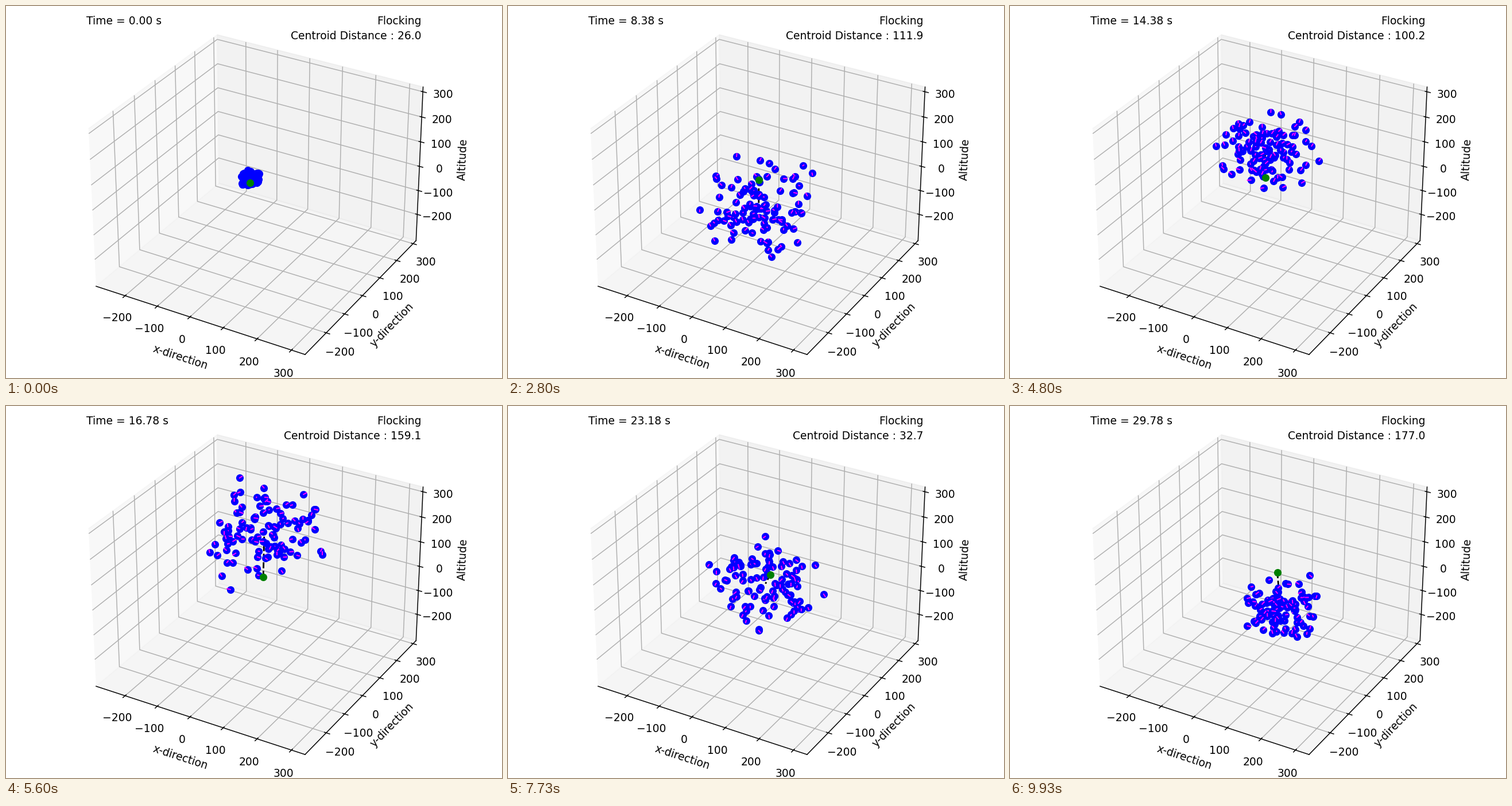
These frames come from a looping animation (864 px wide and 648 px high, 9990 ms). A matplotlib script:

```python
import numpy as np
import matplotlib.pyplot as plt
from matplotlib.animation import FuncAnimation

FRAMES, LOOP_MS = 150, 9990
BIRDS, GROUP = 100, 10
HEADING = 9

# step, centroid offset from the leader (x, y, z), flock spread
KEYS = np.array([
    [0, 3, -5.2, 25.3, 11.5],
    [15, 2, -3, -83, 30],
    [30, 0, 0, -172, 48],
    [42, 0, 0, -111.9, 66],
    [60, 2, -16, 17.5, 40],
    [84, -15, 31, 155.3, 67],
    [94, -12, 14, 163, 62],
    [105, -8, -6, 99.4, 55],
    [126, -2, -17, -134.4, 70],
    [138, -5, 10, -184, 58],
    [149, -7, 30, -174.3, 43],
])


def spline(t, knots, values):
    """Cubic Hermite curve through the knots."""
    slopes = np.gradient(values, knots, axis=0)
    k = np.clip(np.searchsorted(knots, t, side="right") - 1, 0, len(knots) - 2)
    h = (knots[k + 1] - knots[k])[:, None]
    s = (t - knots[k])[:, None] / h
    return ((1 + 2 * s) * (1 - s) ** 2 * values[k]
            + s * (1 - s) ** 2 * h * slopes[k]
            + s ** 2 * (3 - 2 * s) * values[k + 1]
            + s ** 2 * (s - 1) * h * slopes[k + 1])


def simulate():
    """Leader, centroid, bird positions and headings for every step."""
    rng = np.random.default_rng(12)
    t = np.arange(FRAMES)
    curve = spline(t, KEYS[:, 0], KEYS[:, 1:])
    offset, spread = curve[:, :3], curve[:, 3]

    start, end = np.array([-10, 15, 0]), np.array([15, 95, 0])
    leader = start + (end - start) * t[:, None] / (FRAMES - 1)
    centroid = leader + offset

    # each bird swings around the centroid, starting inside a cube
    first = rng.uniform(-1.73, 1.73, (BIRDS, 3))
    second = rng.normal(0, 1, (BIRDS, 3))
    omega = 2 * np.pi / 100 * rng.uniform(0.7, 1.3, (BIRDS, 1))
    phase = omega * t[:, None, None]
    swing = first * np.cos(phase) + second * np.sin(phase)
    swing -= swing.mean(axis=1, keepdims=True)
    birds = centroid[:, None] + spread[:, None, None] * swing

    heading = np.gradient(birds, axis=0)
    heading *= HEADING / np.linalg.norm(heading, axis=2, keepdims=True)
    heading[0] = 0
    return leader, centroid, birds, heading


leader, centroid, birds, heading = simulate()
distance = np.linalg.norm(centroid - leader, axis=1)

fig = plt.figure(figsize=(6.4, 4.8), dpi=135)
ax = fig.add_axes([0, 0, 1, 1], projection="3d")
ax.view_init(elev=30, azim=-60)
ax.set(xlim=(-291.5, 339), ylim=(-311.5, 318.5), zlim=(-311.3, 318.7),
       xlabel="x-direction", ylabel="y-direction", zlabel="Altitude")
ticks = range(-200, 301, 100)
ax.set_xticks(ticks)
ax.set_yticks(ticks)
ax.set_zticks(ticks)

clock = ax.text2D(0.05, 0.95, "", transform=ax.transAxes)
ax.text2D(0.95, 0.95, "Flocking", ha="right", transform=ax.transAxes)
gap = ax.text2D(0.95, 0.91, "", ha="right", transform=ax.transAxes)


def line(style, **kw):
    return ax.plot([], [], [], style, **kw)[0]


link = line("k--")
flock = [(line("bo"), line("-", color="magenta", lw=1.1))
         for _ in range(BIRDS // GROUP)]
leader_dot = line("o", color="green")


def update(i):
    clock.set_text(f"Time = {max(0, 0.2 * i - 0.02):.2f} s")
    gap.set_text(f"Centroid Distance : {distance[i]:.1f}")
    link.set_data_3d(*np.array([leader[i], centroid[i]]).T)
    leader_dot.set_data_3d(*leader[i][:, None])
    for n, (dots, stubs) in enumerate(flock):
        part = slice(n * GROUP, (n + 1) * GROUP)
        pos, way = birds[i, part], heading[i, part]
        dots.set_data_3d(*pos.T)
        # NaN rows break the line between birds
        rows = np.stack([pos, pos + way, np.full_like(pos, np.nan)], axis=1)
        stubs.set_data_3d(*rows.reshape(-1, 3).T)
        stubs.set_visible(i > 0)
    return []


anim = FuncAnimation(fig, update, frames=FRAMES, interval=LOOP_MS / FRAMES,
                     repeat=True)
plt.show()
```
